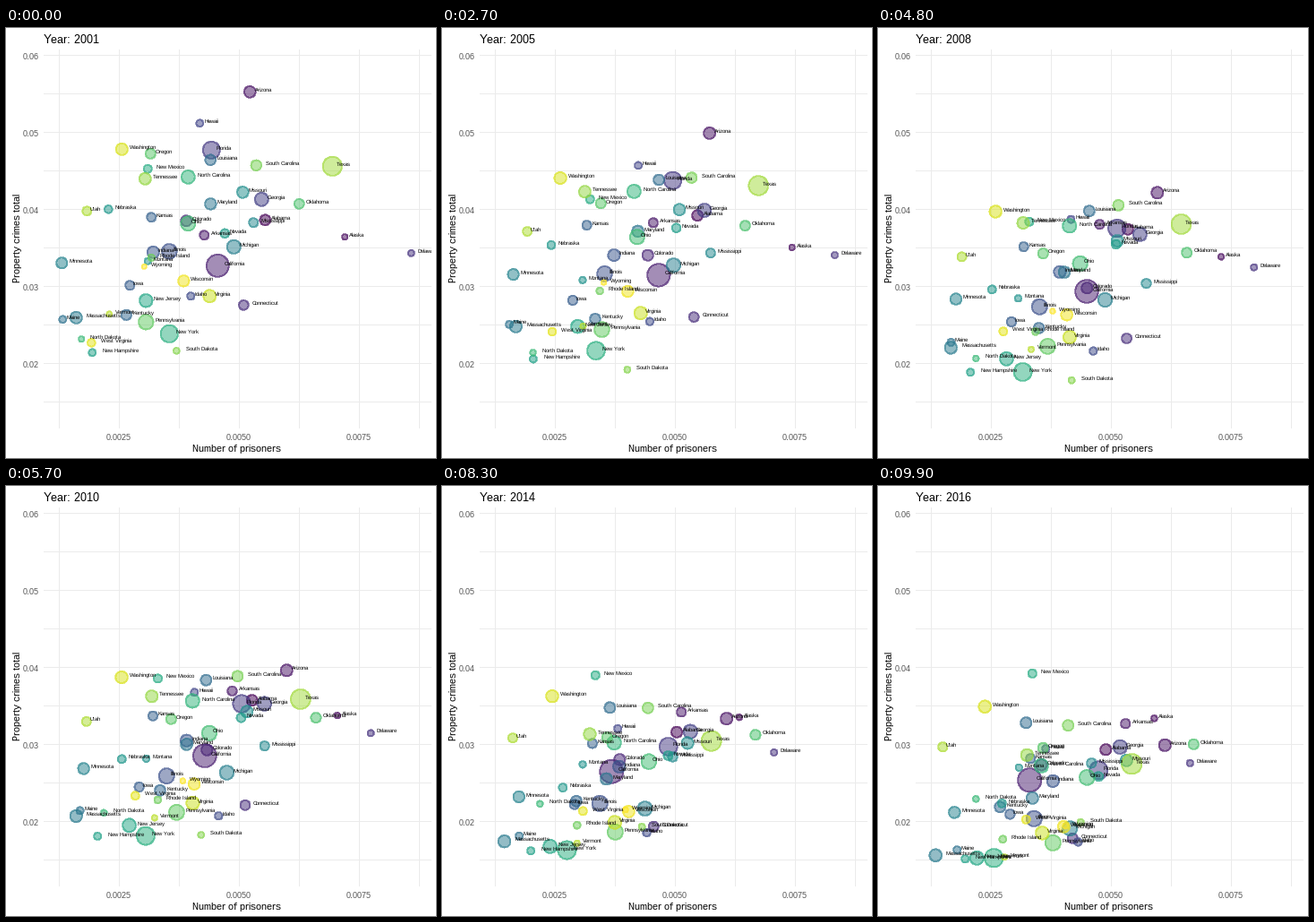
Write a matplotlib script that moves like this. It is 480 by 480 pixels and loops after 10000 ms.

```python
import matplotlib.pyplot as plt
import numpy as np
from matplotlib.animation import FuncAnimation

plt.rcParams.update({
    "font.family": "Liberation Sans",
    "text.hinting": "native",
    "text.hinting_factor": 1,
})

FRAMES, INTERVAL = 100, 100
FIRST, LAST, TURN = 2001, 2016, 39   # TURN: frame of the middle key point
GROWTH = 0.12                        # population growth over the whole span
POP_MIN, POP_MAX = 0.49, 39.2        # millions
GREY, PALE = "#4d4d4d", "#ebebeb"

names, pops, paths = [], [], []


def state(name, pop, *points):
    """Mean population in millions; start, middle and end of the bubble's path."""
    names.append(name)
    pops.append(pop)
    paths.append(points)


state("Alabama", 4.7, (289, 214), (283, 205), (254, 294))
state("Alaska", .69, (378, 233), (396, 254), (308, 259))
state("Arizona", 6.1, (272, 71), (310, 154), (320, 289))
state("Arkansas", 2.8, (221, 231), (242, 206), (276, 265))
state("California", 36.9, (236, 265), (244, 284), (169, 328))
state("Colorado", 5, (201, 215), (242, 284), (182, 311))
state("Connecticut", 3.5, (265, 309), (288, 333), (217, 393))
state("Delaware", .88, (452, 251), (432, 255), (348, 309))
state("Florida", 18.5, (229, 136), (270, 197), (246, 317))
state("Georgia", 9.3, (285, 191), (296, 213), (270, 291))
state("Hawaii", 1.3, (216, 106), (220, 191), (187, 293))
state("Idaho", 1.5, (206, 299), (243, 350), (223, 397))
state("Illinois", 12.6, (182, 249), (181, 294), (174, 371))
state("Indiana", 6.4, (164, 250), (204, 256), (195, 329))
state("Iowa", 3, (138, 287), (149, 317), (147, 366))
state("Kansas", 2.8, (162, 211), (161, 227), (170, 304))
state("Kentucky", 4.3, (134, 320), (187, 328), (136, 358))
state("Louisiana", 4.6, (228, 147), (248, 187), (165, 264))
state("Maine", 1.3, (63, 325), (80, 335), (88, 406))
state("Maryland", 5.7, (228, 196), (214, 251), (172, 348))
state("Massachusetts", 6.6, (78, 323), (84, 341), (64, 412))
state("Michigan", 10, (254, 244), (260, 281), (214, 382))
state("Minnesota", 5.2, (62, 262), (87, 285), (85, 364))
state("Mississippi", 2.9, (276, 217), (310, 278), (238, 309))
state("Missouri", 5.9, (264, 183), (265, 218), (277, 306))
state("Montana", .98, (158, 260), (156, 298), (157, 314))
state("Nebraska", 1.8, (114, 202), (125, 274), (138, 354))
state("Nevada", 2.5, (244, 229), (269, 218), (246, 324))
state("New Hampshire", 1.3, (96, 362), (104, 375), (97, 416))
state("New Jersey", 8.7, (156, 304), (149, 356), (110, 415))
state("New Mexico", 2, (158, 157), (168, 218), (172, 209))
state("New York", 19.4, (182, 341), (167, 375), (129, 415))
state("North Carolina", 9.2, (203, 166), (219, 195), (182, 312))
state("North Dakota", .7, (84, 347), (109, 374), (109, 349))
state("Ohio", 11.5, (203, 218), (224, 245), (233, 325))
state("Oklahoma", 3.7, (327, 196), (343, 240), (352, 288))
state("Oregon", 3.8, (161, 140), (184, 240), (184, 292))
state("Pennsylvania", 12.5, (156, 328), (188, 343), (195, 398))
state("Rhode Island", 1.1, (162, 256), (182, 323), (139, 394))
state("South Carolina", 4.5, (279, 153), (278, 178), (212, 267))
state("South Dakota", .81, (190, 360), (214, 398), (226, 375))
state("Tennessee", 6.2, (155, 168), (161, 194), (166, 300))
state("Texas", 24.6, (364, 154), (348, 193), (283, 310))
state("Utah", 2.7, (90, 204), (97, 245), (72, 291))
state("Vermont", .62, (115, 319), (176, 343), (141, 414))
state("Virginia", 7.8, (227, 299), (219, 333), (183, 387))
state("Washington", 6.6, (129, 135), (133, 193), (119, 246))
state("West Virginia", 1.8, (95, 351), (135, 329), (165, 372))
state("Wisconsin", 5.6, (198, 282), (211, 303), (207, 380))
state("Wyoming", .53, (154, 266), (192, 298), (209, 379))

pops = np.array(pops)
start, middle, end = np.array(paths, float).swapaxes(0, 1) + 0.3

# At 72 dpi one point is one pixel; the panel is addressed in stage pixels.
fig = plt.figure(figsize=(480 / 72, 480 / 72), dpi=72, facecolor="white")
ax = fig.add_axes([42 / 480, 33 / 480, 433 / 480, 423 / 480])
ax.set(xlim=(42, 475), ylim=(447, 24))
ax.axis("off")

for x in range(7):
    ax.axvline(58.5 + 67 * x, color=PALE, lw=1, zorder=0)
for y in range(10):
    ax.axhline(30.5 + 43 * y, color=PALE, lw=1, zorder=0)


def write(x, y, text, size, **kw):
    return ax.text(x, y, text, fontsize=size, va="baseline", **kw)


for k in range(3):
    write(126 + 134 * k, 460, f"{0.0025 * (k + 1):.4f}", 9, ha="center", color=GREY)
for k in range(5):
    write(37, 35 + 86 * k, f"{0.06 - 0.01 * k:.2f}", 9, ha="right", color=GREY)
write(258, 473, "Number of prisoners", 11, ha="center")
write(16, 235, "Property crimes total", 11, ha="center", rotation=90, rotation_mode="anchor")
title = write(42, 17, "", 13)

colors = plt.get_cmap("viridis")(np.linspace(0, 1, len(names)))
bubbles = ax.scatter(*start.T, c=colors, edgecolors=colors, alpha=0.5,
                     linewidths=1, antialiased=False, zorder=2)
labels = [write(*p, name, 6, clip_on=True, zorder=3) for name, p in zip(names, start)]
renderer = fig.canvas.get_renderer()
shifts = [0.3 * label.get_window_extent(renderer).width for label in labels]


def radius(pop):
    share = np.clip((pop - POP_MIN) / (POP_MAX - POP_MIN), 0, 1)
    return 2.49 + 10.67 * np.sqrt(share)


def positions(i):
    """Prison rates move evenly; crime falls slowly, quickens, then eases out."""
    if i < TURN:
        a, b, s, power = start, middle, i / TURN, 1.6
    else:
        a, b, s, power = middle, end, (i - TURN) / (FRAMES - 1 - TURN), 0.8
    return a + (b - a) * np.array([s, s ** power])


def update(i):
    t = i / (FRAMES - 1)
    title.set_text(f"Year: {round(FIRST + (LAST - FIRST) * t)}")
    pos = positions(i)
    bubbles.set_offsets(pos)
    bubbles.set_sizes((2 * radius(pops * (1 + GROWTH * (t - 0.5)))) ** 2)
    for label, (x, y), dx in zip(labels, pos, shifts):
        label.set_position((x + dx, y - 0.5))
    return [title, bubbles, *labels]


anim = FuncAnimation(fig, update, frames=FRAMES, interval=INTERVAL, repeat=True, repeat_delay=0)
plt.show()
```
